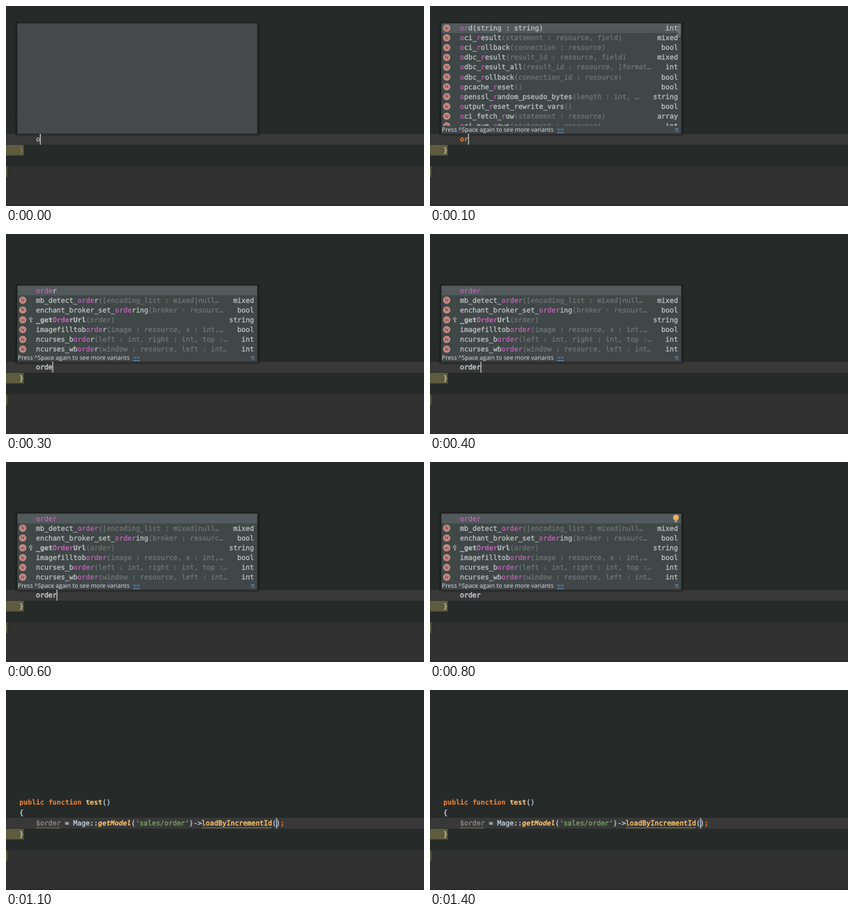
An HTML page that plays this animation: 600x288 px, repeating every 1500 ms.

```html
<!DOCTYPE html>
<html lang="en">
<head>
<meta charset="utf-8">
<title>Editor completion</title>
<style>
  html, body { margin: 0; width: 100%; height: 100%; overflow: hidden; background: #262a29; }
  svg { display: block; width: 600px; height: 288px; }
  text { white-space: pre; text-rendering: geometricPrecision; font-family: "DejaVu Sans Mono", monospace; }
  .code { font-size: 9.88px; stroke-width: .4px; }
  .item { font-size: 9.94px; stroke-width: .25px; }
  .foot { font: 8.6px "Open Sans", sans-serif; }
  .icon { font: italic 6px "DejaVu Sans", sans-serif; }
  .b { font-weight: bold; stroke-width: .1px; }
  .i { font-style: italic; }
</style>
</head>
<body>
<svg id="stage" viewBox="0 0 600 288"></svg>
<script>
const LOOP = 1500, STEP = 100;
const CW = 5.95, LEFT = 43, ROW = 14.1;
const C = {
  bg: '#262a29', line: '#383838', low: '#313131', olive: '#5d5c3f',
  popup: '#45494b', list: '#3f4747', pick: '#525a5c', foot: '#414648',
  text: '#c2c6c7', dim: '#727778', match: '#c263b8', plain: '#bccad6',
  key: '#e8833a', func: '#ffc66d', str: '#759a64', vari: '#a97fba', unused: '#858585'
};
const stage = document.getElementById('stage');

const esc = s => s.replace(/&/g, '&amp;').replace(/</g, '&lt;').replace(/>/g, '&gt;');
const rect = (x, y, w, h, fill, extra = '') =>
  `<rect x="${x}" y="${y}" width="${w}" height="${h}" fill="${fill}" ${extra}/>`;
const text = (x, y, cls, body, extra = '') =>
  `<text x="${x}" y="${y}" class="${cls}" ${extra}>${body}</text>`;
const span = (s, fill, cls = '') =>
  `<tspan fill="${fill}" stroke="${fill}" class="${cls}">${esc(s)}</tspan>`;

// Tildes enclose the matched letters of a name.
const marked = (s, cls) =>
  s.split('~').map((p, i) => p && span(p, i % 2 ? C.match : C.text, cls)).join('');

const shortList = [
  ['~ord~', '(string : string)', 'int'],
  ['mb_detect_~ord~er', '([encoding_list : mixed|null…', 'mixed'],
  ['_get~Ord~erUrl', '(order)', 'string', 'm'],
  ['dns_check_rec~ord~', '(host, [type])', 'bool'],
  ['ssh2_auth_passw~ord~', '(session : resource, usern…', 'bool']
];
const longList = [
  ['~or~d', '(string : string)', 'int'],
  ['~o~ci_~r~esult', '(statement : resource, field)', 'mixed'],
  ['~o~ci_~r~ollback', '(connection : resource)', 'bool'],
  ['~o~dbc_~r~esult', '(result_id : resource, field)', 'mixed'],
  ['~o~dbc_~r~esult_all', '(result_id : resource, [format…', 'int'],
  ['~o~dbc_~r~ollback', '(connection_id : resource)', 'bool'],
  ['~o~pcache_~r~eset', '()', 'bool'],
  ['~o~penssl_~r~andom_pseudo_bytes', '(length : int, …', 'string'],
  ['~o~utput_~r~eset_rewrite_vars', '()', 'bool'],
  ['~o~ci_fetch_~r~ow', '(statement : resource)', 'array'],
  ['~o~ci_num_~r~ows', '(statement : resource)', 'int']
];
const orderList = word => {
  const cap = 'O' + word.slice(1), rest = 'order'.slice(word.length);
  const name = (a, z = '', w = word) => `${a}~${w}~${rest}${z}`;
  return [
    [name(''), '', '', ''],
    [name('mb_detect_'), '([encoding_list : mixed|null…', 'mixed'],
    [name('enchant_broker_set_', 'ing'), '(broker : resourc…', 'bool'],
    [name('_get', 'Url', cap), '(order)', 'string', 'm'],
    [name('imagefilltob'), '(image : resource, x : int,…', 'bool'],
    [name('ncurses_b'), '(left : int, right : int, top :…', 'int'],
    [name('ncurses_wb'), '(window : resource, left : int…', 'int']
  ];
};

function icon(y, kind) {
  if (!kind) return '';
  const key = kind === 'm'
    ? `<g fill="none" stroke="#b5b9ba"><circle cx="35.5" cy="${y - 1.5}" r="1.8"/><path d="M35.5 ${y + .5}v3.5M35.5 ${y + 2.5}h2"/></g>` : '';
  return `<circle cx="24" cy="${y}" r="5.2" fill="#c48a86"/>` +
    text(24, y + 2, 'icon', kind, 'text-anchor="middle" fill="#4c2f2f"') + key;
}

function item([name, args, type, kind = 'fx'], y, picked) {
  const bold = kind === 'm' ? 'b' : '';
  return icon(y, kind) +
    text(LEFT, y + 3.3, 'item', marked(name, bold) + span(args, picked ? C.text : C.dim)) +
    text(356, y + 3.3, 'item', span(type, C.text), 'text-anchor="end"');
}

function popup(top, rows, footer, thumb) {
  const h = 184 - top;
  let s = [4, 2.5, 1].map(d =>
    rect(16 - d, top - d / 2, 345 + 2 * d, h + d * 1.5, '#000', 'opacity=".1" rx="2"')).join('');
  s += rect(16, top, 345, h, '#303536');
  if (!rows) return s + rect(16.7, top + .7, 343.6, h - 1.2, C.popup);
  s += rect(16.7, top + .7, 343.6, h - 1.2, C.list) + rect(16.7, top + .7, 343.6, 13.7, C.pick);
  s += `<clipPath id="clip"><rect x="16" y="${top}" width="345" height="${h - .5}"/></clipPath><g clip-path="url(#clip)">`;
  s += rows.map((r, i) => item(r, top + 7.2 + i * ROW, !i)).join('') + '</g>';
  if (thumb) s += rect(355.2, top + 2, 4.5, thumb, '#8b9091', 'opacity=".45" rx="2"');
  if (footer) {
    s += rect(16.7, 172.6, 343.6, 10.9, C.foot) +
      text(17, 181, 'foot', 'Press ^Space again to see more variants', 'fill="#e0e2e3"') +
      text(182.5, 181, 'foot', '&gt;&gt;', 'fill="#6aa5d8" text-decoration="underline"') +
      text(351.5, 181, 'foot', 'π', 'fill="#6aa5d8"');
  }
  return s;
}

const bulb = () => '<circle cx="353" cy="80" r="4.1" fill="#e9b45c"/>' +
  rect(351, 83.5, 4, 3.6, '#a59a86', 'rx="1"');

const caret = n => rect(LEFT + n * CW - .3, 184, 1.3, 15.6, '#c4c7c8');

function wave(col, n, color) {
  const x = LEFT + col * CW;
  let d = `M${x} 199`;
  for (let i = 1; i * 1.5 <= n * CW; i++) d += `L${x + i * 1.5} ${i % 2 ? 198 : 199}`;
  return `<path d="${d}" fill="none" stroke="${color}" stroke-width=".9"/>`;
}

// Faint marks for leading spaces.
const dots = (y, n, color) =>
  Array.from({ length: n }, (_, i) => rect((i + 1) * CW - 2.2, y, .9, .9, color)).join('');

function base(step) {
  const brace = step ? '#c3c5b4' : '#77765a';
  return rect(0, 0, 600, 288, C.bg) + rect(0, 231, 600, 57, C.low) +
    rect(0, 184, 600, 15.7, C.line) + rect(0, 286.5, 600, 1.5, '#2b2a2b') +
    rect(0, 200, 25.5, 15.2, C.olive) + rect(0, 231, 1.8, 15.4, C.olive) +
    dots(163, 3, '#434846') + dots(178.5, 3, '#434846') + dots(194, 7, '#4c4d4d') +
    text(19.3, 164.5, 'code', span('public function ', C.key, 'b') + span('test', C.func, 'b') + span('()', C.plain)) +
    text(19.3, 179.7, 'code', span('{', C.plain)) +
    text(19.3, 210.7, 'code', span('}', brace)) +
    text(-4.5, 241.7, 'code', span('}', brace));
}

const typed = body => text(LEFT, 195.1, 'code', body);

function statement(lit, waves) {
  const fn = lit ? C.func : C.plain;
  let s = typed(
    span('$order', lit ? C.unused : C.vari) + span(' = Mage::', C.plain) +
    span('getModel', fn, lit ? 'b i' : '') + span('(', C.plain) +
    span("'sales/order'", C.str) + span(')->', C.plain) +
    span('loadByIncrementId', fn) + span('()', C.plain) + span(';', C.key));
  if (waves) s += wave(0, 6, '#75805f') + wave(40, 17, '#94885b');
  return s;
}

function draw(step) {
  let s = base(step);
  if (step === 0) s += popup(24.5) + typed(span('o', '#a0a3a3', 'b')) + caret(1);
  else if (step === 1) s += popup(24.5, longList, true, 19) + typed(span('or', C.key, 'b')) + caret(2);
  else if (step === 2) s += popup(116.3, shortList, false, 48) + rect(337.5, 117, 12.5, 12, '#dcdedd') +
    typed(span('ord', C.plain)) + caret(3);
  else if (step < 9) {
    const word = step === 3 ? 'orde' : 'order';
    s += popup(74, orderList(word), true) + typed(span(word, '#c9d0d6'));
    s += step > 6 ? bulb() : caret(word.length);
  } else {
    s += statement(step > 9, step > 10);
    if (step !== 13) s += caret(58);
  }
  stage.innerHTML = s;
}

let last = -1;
const start = performance.now();
function tick() {
  const step = Math.floor((performance.now() - start) % LOOP / STEP);
  if (step !== last) draw(last = step);
  requestAnimationFrame(tick);
}
tick();
</script>
</body>
</html>
```
